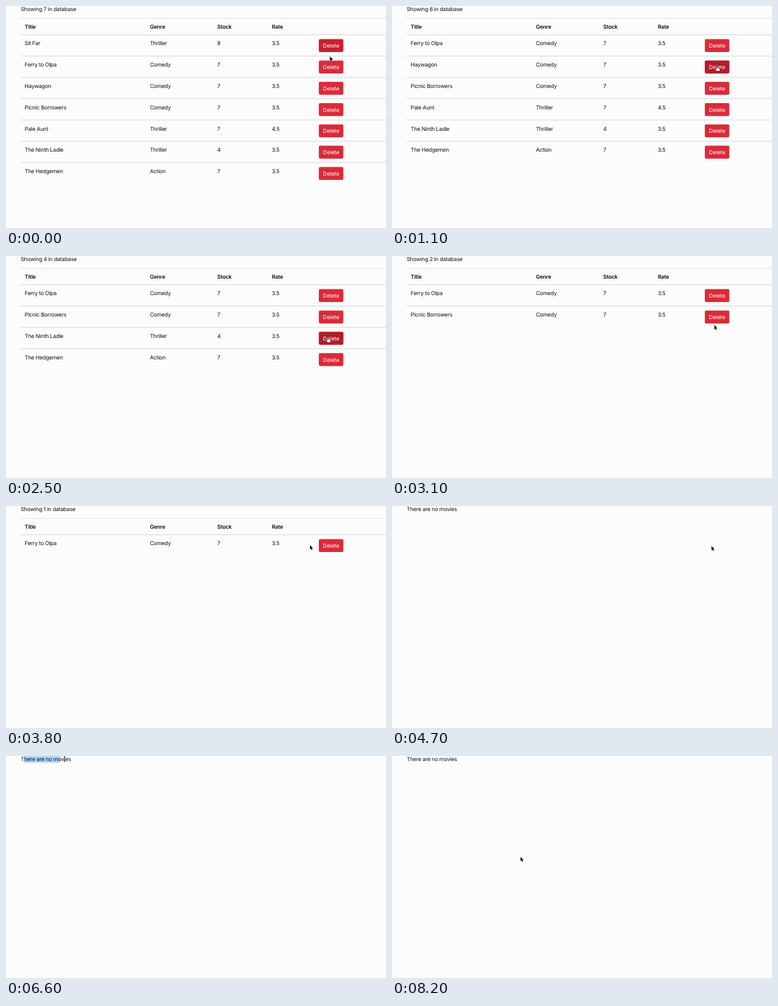
Write an HTML page that moves like this. It is 600x352 px and loops after 8.9 s.

```html
<!DOCTYPE html>
<html lang="en">
<head>
<meta charset="utf-8">
<title>Movie table</title>
<style>
  html, body { margin: 0; width: 100%; height: 100%; overflow: hidden; background: #fcfcfc; }
  svg { display: block; width: 600px; height: 352px; }
  text { font: 8.6px Inter, "Liberation Sans", sans-serif; letter-spacing: -.2px; fill: #0c0e10; white-space: pre; text-rendering: geometricPrecision; }
  .head { font-weight: 600; }
  .line { fill: #dadcdf; }
  .button { fill: #da2b3a; }
  .hover .button { fill: #c52130; }
  .pressed .button { fill: #b41c29; stroke: #dc3545; stroke-opacity: .35; }
  .label { fill: #fff; text-anchor: middle; letter-spacing: -.08px; }
</style>
</head>
<body>
<svg viewBox="0 0 600 352">
  <rect id="selection" x="28.4" y="0" height="10.6" fill="#add5fc"/>
  <text id="message" x="23.3" y="8.2"></text>
  <g id="table">
    <rect class="line" x="23" y="19.2" width="577" height="1" opacity=".7"/>
  </g>
  <g id="cursor">
    <path id="arrow" d="M0 0V7L1.6 5.6 2.7 8 3.8 7.5 2.7 5.1H4.8Z" stroke="#fff" stroke-width=".7" paint-order="stroke"/>
    <path id="hand" d="M-.9 .8Q0 -.6 .9 .8V3Q2 2.6 2.4 3.4 3.6 3 3.9 4 5 3.8 5 4.8V6.3Q5 7.5 4 8.6H-.3Q-2 6.6 -3 5-2.6 3.8 -.9 5.2Z" fill="#fff" stroke="#111" stroke-width=".8"/>
    <path id="beam" d="M-1.5 -4Q0 -4 0 -3 0 -4 1.5 -4M0 -3V3M-1.5 4Q0 4 0 3 0 4 1.5 4M-.8 1H.8" fill="none" stroke="#111" stroke-width=".8"/>
  </g>
</svg>
<script>
const LOOP = 8900, STEP = 100;
const ROW = 33.78;
const BUTTON = { x: 494, y: 52.6, width: 38.7, height: 20.5 };
const COLUMNS = [29.6, 227.2, 333.5, 419.7];
const movies = [
  ["Sit Far", "Thriller", 8, 3.5],
  ["Ferry to Olpa", "Comedy", 7, 3.5],
  ["Haywagon", "Comedy", 7, 3.5],
  ["Picnic Borrowers", "Comedy", 7, 3.5],
  ["Pale Aunt", "Thriller", 7, 4.5],
  ["The Ninth Ladle", "Thriller", 4, 3.5],
  ["The Hedgemen", "Action", 7, 3.5]
];
const deletions = [600, 1200, 2100, 2600, 3000, 3500, 4700];
const dragFrom = 6100, dragClear = 7000;

// Pointer moves: start, end, x, y
const moves = [
  [-1, 0, 511.5, 80],
  [0, 300, 512, 64],
  [600, 1000, 513, 95],
  [1300, 1700, 508, 140],
  [2000, 3000, 508, 127],
  [3000, 3500, 510, 91],
  [3500, 3800, 480, 62],
  [3800, 4000, 504.5, 63.5],
  [4800, 6000, 28.5, 5],
  [dragFrom, 6600, 92.5, 5],
  [6600, 6800, 122, 6],
  [7200, 7500, 127, 14],
  [7900, 8200, 203, 160]
];

const $ = id => document.getElementById(id);
const show = (node, on) => node.style.display = on ? "" : "none";
const clamp = (value, low, high) => Math.min(high, Math.max(low, value));
const easeOut = part => 1 - (1 - part) ** 3;

function add(parent, tag, attributes, content = "") {
  const node = document.createElementNS("http://www.w3.org/2000/svg", tag);
  for (const name in attributes) node.setAttribute(name, attributes[name]);
  node.textContent = content;
  return parent.appendChild(node);
}

function pointerAt(time) {
  let x = 0, y = 0;
  for (const [start, end, toX, toY] of moves) {
    const part = easeOut(clamp((time - start) / (end - start), 0, 1));
    x += (toX - x) * part;
    y += (toY - y) * part;
  }
  return { x, y };
}

const rowAt = y => Math.round((y - BUTTON.y - BUTTON.height / 2) / ROW);

function isOver(index, { x, y }) {
  const dx = x - BUTTON.x, dy = y - BUTTON.y - index * ROW;
  return dx > 0 && dx < BUTTON.width && dy > 0 && dy < BUTTON.height;
}

["Title", "Genre", "Stock", "Rate"].forEach((title, i) =>
  add($("table"), "text", { class: "head", x: COLUMNS[i], y: 36.2 }, title));

const rows = movies.map(cells => {
  const row = add($("table"), "g", {});
  add(row, "rect", { class: "line", x: 23, y: 45, width: 577, height: 1.2 });
  cells.forEach((cell, i) => add(row, "text", { x: COLUMNS[i], y: 62.4 }, cell));
  add(row, "rect", { class: "button", rx: 2.1, ...BUTTON });
  add(row, "text", { class: "label", x: 513.4, y: 66.2 }, "Delete");
  return row;
});

function draw(now) {
  const time = Math.floor(now % LOOP / STEP) * STEP;
  const pointer = pointerAt(time);
  const left = rows.slice();
  for (const at of deletions) {
    if (time >= at) left.splice(rowAt(pointerAt(at - STEP).y), 1);
  }
  const pressing = deletions.includes(time + STEP);

  rows.forEach(row => show(row, left.includes(row)));
  left.forEach((row, i) => {
    const over = isOver(i, pointer);
    const fading = time === 0 && i === 0;
    row.setAttribute("transform", `translate(0 ${i * ROW})`);
    row.setAttribute("class", over && pressing ? "pressed" : over || fading ? "hover" : "");
  });

  const empty = !left.length;
  show($("table"), !empty);
  $("message").textContent = empty ? "There are no movies" : `Showing ${left.length} in database`;

  const selecting = time >= dragFrom && time < dragClear;
  $("selection").setAttribute("width", selecting ? clamp(pointer.x - 35.4, 0, 72.6) : 0);

  const overButton = left.some((row, i) => isOver(i, pointer));
  const overText = empty && pointer.x > 23 && pointer.x < 102 && pointer.y < 11;
  $("cursor").setAttribute("transform", `translate(${pointer.x} ${pointer.y})`);
  show($("hand"), overButton);
  show($("beam"), overText);
  show($("arrow"), !overButton && !overText);
}

const start = performance.now();
function tick() {
  draw(performance.now() - start);
  requestAnimationFrame(tick);
}
tick();
</script>
</body>
</html>
```
